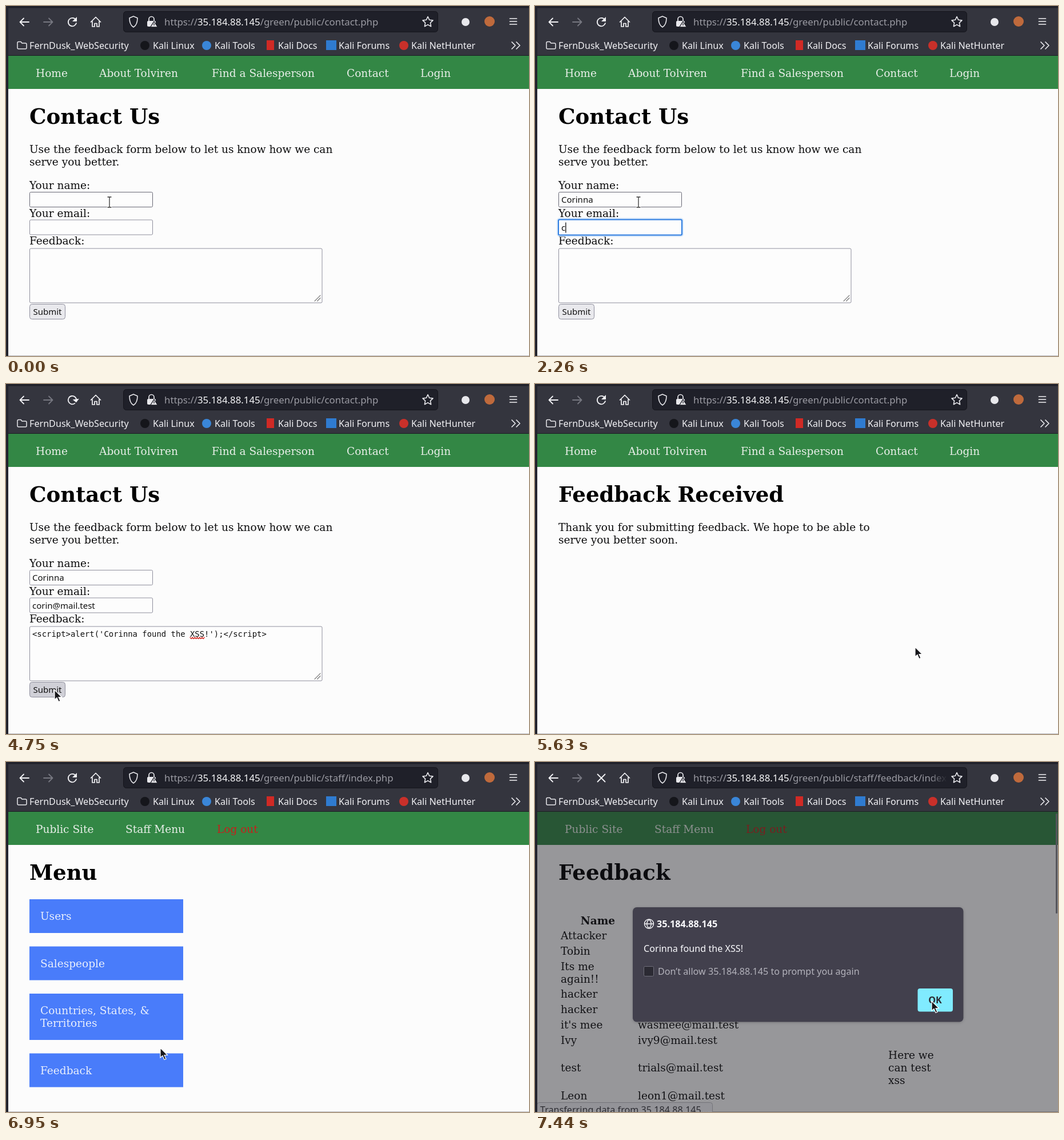
Recreate the animation shown at these times as an HTML page. Size 915 by 612 pixels, loop 8000 ms.

```html
<!DOCTYPE html>
<html lang="en">
<head>
<meta charset="utf-8">
<style>
  html, body { margin: 0; width: 100%; height: 100%; overflow: hidden; background: #fcfcfc; }
  svg { display: block; width: 915px; height: 612px; }
  text { white-space: pre; }
  .ui { font-family: "Noto Sans", "Open Sans", sans-serif; font-size: 16.15px; }
  .url { font-size: 16.82px; }
  .field { font-family: "Noto Sans", "Open Sans", sans-serif; font-size: 15px; }
  .code { font-family: "DejaVu Sans Mono", monospace; font-size: 13.9px; }
  .page { font-family: "DejaVu Serif", serif; font-size: 18.55px; }
  .h1 { font-size: 37.1px; font-weight: bold; }
</style>
</head>
<body>
<svg id="stage" viewBox="0 0 915 612"></svg>
<script>
const LOOP = 8000;
const HOST = "35.184.88.145";
const NAME = "Corinna";
const EMAIL = "corin@mail.test";
const stage = document.getElementById("stage");
const ruler = document.createElement("canvas").getContext("2d");

const text = (x, y, str, cls = "page", fill = "#0c0c0d", extra = "") =>
  `<text x="${x}" y="${y}" class="${cls}" fill="${fill}" ${extra}>${str}</text>`;
const rect = (x, y, w, h, fill, extra = "") =>
  `<rect x="${x}" y="${y}" width="${w}" height="${h}" fill="${fill}" ${extra}/>`;
const dot = (x, y, r, fill) => `<circle cx="${x}" cy="${y}" r="${r}" fill="${fill}"/>`;
const line = (d, color = "#f2f2f5", width = 1.8, extra = "") =>
  `<path d="${d}" fill="none" stroke="${color}" stroke-width="${width}" stroke-linecap="round" stroke-linejoin="round" ${extra}/>`;
const heading = str => text(41, 206, str, "page h1", "#000");

function textWidth(str) {
  ruler.font = '15px "Noto Sans", "Open Sans", sans-serif';
  return ruler.measureText(str).width;
}

// ---- browser chrome ----

function reloadIcon(mode) {
  if (mode === "stop") return line("M109.5 21.5l13 13M122.5 21.5l-13 13");
  if (mode === "closing") return line("M111 23l9 9");
  const turn = mode === "spin" ? 'transform="rotate(38 116 28)"' : "";
  return `<g ${turn}>${line("M122 24A7.2 7.2 0 1 0 123 30")}<path d="M124 19v8h-8z" fill="#f2f2f5"/></g>`;
}

function addressBar({ path, key, page }) {
  const x = key ? 309 : 277;
  const grey = "#9b9ba3";
  return rect(205.5, 9.5, 550, 36, "#1f2029", 'rx="5" stroke="#15151c"') +
    line("M223 18l7 3c0 8-2 13-7 16c-5-3-7-8-7-16z", "#e8e8ec", 1.6) +
    line("M250 26v-3a4.5 4.5 0 0 1 9 0v3", "#e8e8ec", 1.7) +
    rect(247, 26, 15, 10, "#e8e8ec", 'rx="2"') +
    `<path d="M259 27l6.5 10h-13z" fill="#e8e8ec" stroke="#1f2029" stroke-width="1.3"/>` +
    line("M259 31v2.5", "#1f2029", 1.3) +
    (key ? `<circle cx="283" cy="27" r="3.8" fill="none" stroke="#e8e8ec" stroke-width="1.8"/>` +
      line("M287 27h10v3M293 27v3", "#e8e8ec", 1.8) : "") +
    `<g clip-path="url(#urlClip)">` +
    text(x, 33.5, `https://<tspan fill="#f5f5f7">${HOST}</tspan>${path}`, "ui url", grey) + "</g>" +
    (page === "feedback" ? rect(690, 12, 31, 31, "url(#urlFade)") : "") +
    line("M738 18.5l2.7 5.8 6.3.8-4.6 4.3 1.2 6.3-5.6-3.1-5.6 3.1 1.2-6.3-4.6-4.3 6.3-.8z", "#e8e8ec", 1.6);
}

function bookmarks() {
  const items = [
    [257, "Kali Linux", dot(243, 69, 8, "#15161b")],
    [365, "Kali Tools", dot(351, 69, 8, "#3a86d8")],
    [476, "Kali Docs", rect(456, 60, 13, 17, "#d02a25")],
    [582, "Kali Forums", rect(560, 60, 18, 17, "#2f7bd0")],
    [709, "Kali NetHunter", dot(696, 69, 8, "#c9302a")]
  ];
  return line("M20 64.5q0-2 2-2h4l2 2.5h6q2 0 2 2v6q0 2-2 2h-12q-2 0-2-2z", "#e8e8ec", 1.5) +
    text(41, 75, "FernDusk_WebSecurity", "ui", "#f2f2f5") +
    items.map(([x, label, icon]) => icon + text(x, 75, label, "ui", "#f2f2f5")).join("") +
    line("M885 63l6 6-6 6M893 63l6 6-6 6", "#e8e8ec", 1.7);
}

const chrome = s =>
  rect(0, 0, 915, 87, "#34353e") + rect(0, 0, 915, 3.5, "#1f2029") +
  line("M40 28H25M31 21.5L24.5 28l6.5 6.5") +
  line("M66 28h15M75 21.5l6.5 6.5-6.5 6.5", "#777881") +
  reloadIcon(s.reload) +
  line("M148.5 28l8.5-8.5 8.5 8.5M151 27v9h4v-5.5h4V36h4v-9", "#f2f2f5", 1.7) +
  addressBar(s) +
  dot(804, 28, 7, "#e8e8ec") + dot(846, 27, 9, "#bf6a3c") +
  line("M881.5 22h12M881.5 27h12M881.5 32h12", "#f2f2f5", 1.7) +
  bookmarks() + rect(0, 86, 915, 1, "#1b1c22");

// ---- form parts ----

function box(x, y, w, h, focus, hover) {
  if (!focus) return rect(x + .5, y + .5, w - 1, h - 1, "#fdfdfd", `rx="2" stroke="${hover ? "#676774" : "#8f8f9d"}"`);
  return rect(x - 3, y - 3, w + 6, h + 6, "#d3e6fa", 'rx="5"') +
    rect(x, y, w, h, "#fdfdfd", 'rx="2" stroke="#2f7de0" stroke-width="2"');
}

const caret = (x, y) => rect(x, y, 1.3, 18, "#111");

function input(y, value, focus, hover) {
  return box(41, y, 216, 27, focus, hover) + text(46, y + 19, value, "field", "#111") +
    (focus ? caret(46 + textWidth(value), y + 5) : "");
}

function password(y, count, focus) {
  let out = box(41, y, 216, 27, focus);
  for (let i = 0; i < count; i++) out += dot(51.2 + i * 10.08, y + 14, 4.1, "#111");
  return out + (focus ? caret(46.5 + count * 10.1, y + 5) : "");
}

const submit = (y, hover) =>
  rect(41.5, y + .5, 62, 26, hover ? "#d0d0d7" : "#e9e9ed", 'rx="4" stroke="#8f8f9d"') +
  text(72.5, y + 19, "Submit", "field", "#111", 'text-anchor="middle"');

function feedbackBox(filled, focus) {
  let out = box(41, 423.5, 512.5, 96, focus) + line("M540 516l10-10M544.5 516l5.5-5.5", "#777", 1.1);
  if (filled) {
    out += text(46, 442, `&lt;script&gt;alert('${NAME} found the XSS!');&lt;/script&gt;`, "code", "#111") +
      line("M322 443" + "l2.1 2.6l2.1-2.6".repeat(6), "#d3261f", 1.2);
  }
  return out + (focus ? caret(filled ? 456 : 46, 428) : "");
}

// ---- pages ----

const nav = (...items) => rect(0, 87, 915, 58, "#338745") +
  items.map(([x, label, color = "#e9efe9"]) => text(x, 124, label, "page", color)).join("");
const publicNav = () => nav([52, "Home"], [163, "About Tolviren"], [360, "Find a Salesperson"], [596, "Contact"], [725, "Login"]);
const staffNav = () => nav([52, "Public Site"], [209, "Staff Menu"], [369, "Log out", "#c5201c"]);

const pages = {
  contact: s => publicNav() + heading("Contact Us") +
    text(41, 257, "Use the feedback form below to let us know how we can") +
    text(41, 279, "serve you better.") +
    text(41, 320, "Your name:") + text(41, 369, "Your email:") + text(41, 417, "Feedback:") +
    input(325, s.name, s.focus === "name", s.cursor[0] === "beam" && s.cursor[2] < 352) +
    input(373.5, s.email, s.focus === "email") +
    feedbackBox(s.pasted, s.focus === "feedback") + submit(521, s.cursor[0] === "arrow"),

  received: () => publicNav() + heading("Feedback Received") +
    text(41, 257, "Thank you for submitting feedback. We hope to be able to") +
    text(41, 279, "serve you better soon."),

  login: s => nav([52, "Public Site"]) + heading("Log in") +
    text(41, 257, "Username:") + text(41, 306, "Password:") +
    input(262.5, s.user, s.focus === "user") + password(311, s.dots, s.focus === "password") + submit(337.5),

  menu(s) {
    const items = [[240, 59, "Users"], [322.5, 59, "Salespeople"],
      [405, 81, "Countries, States, &amp;", "Territories"], [509.5, 59, "Feedback"]];
    return staffNav() + heading("Menu") + items.map(([y, h, ...rows]) =>
      rect(41, y, 269, h, s.hot && rows[0] === "Feedback" ? "#3f6fde" : "#497cfa") +
      rows.map((row, i) => text(60, y + 36 + i * 22, row, "page", "#e9effc")).join("")).join("");
  },

  feedback() {
    const rows = [[310, "Attacker"], [337, "Tobin"], [364, "Its me"], [386, "again!!"], [412, "hacker"], [439, "hacker"],
      [466, "it's mee", "wasmee"], [493, "Ivy", "ivy9"], [541, "test", "trials"], [590, "Leon", "leon1"]];
    return staffNav() + heading("Feedback") +
      text(110, 284, "Name", "page", "#0c0c0d", 'font-weight="bold" text-anchor="middle"') +
      rows.map(([y, name, mail]) => text(45, y, name) + (mail ? text(180, y, mail + "@mail.test") : "")).join("") +
      ["Here we", "can test", "xss"].map((row, i) => text(618, 519 + i * 22, row)).join("");
  }
};

const dialog = () =>
  rect(0, 87, 915, 525, "#1c1b22", 'opacity=".45"') + rect(911, 90, 3, 175, "#55555c", 'rx="1.5"') +
  rect(171, 254, 578.5, 200.5, "#42414d", 'rx="7" filter="url(#shadow)"') +
  line("M191.5 283a8 8 0 1 0 16 0a8 8 0 1 0-16 0h16M199.5 275c-5 5-5 11 0 16c5-5 5-11 0-16", "#f2f2f5", 1.4) +
  text(213, 288.5, HOST, "ui", "#fbfbfe", 'font-weight="600"') +
  text(190, 331.5, `${NAME} found the XSS!`, "ui", "#fbfbfe") +
  rect(190.5, 357.5, 17, 17, "#2b2a33", 'rx="2" stroke="#6f6e7a"') +
  text(215, 372, `Don’t allow ${HOST} to prompt you again`, "ui", "#b3b2bb") +
  rect(669.5, 396, 61.5, 40.5, "#80ebff", 'rx="4"') +
  text(700, 422, "OK", "ui", "#2b2a33", 'font-weight="600" text-anchor="middle"');

const statusBar = ([label, width]) =>
  rect(3.5, 595.5, width, 30, "#f6f6f8", 'rx="4" stroke="#bdbdc3"') + text(9, 614, label, "ui", "#3c3c42");

function pointer([kind, x, y, halo]) {
  const glow = halo ? dot(x, y, 18.5, "#fbf35a") : "";
  if (kind === "beam") {
    const d = `M${x - 3} ${y - 9}h2.5q.5 0 .5 1v16q0 1-.5 1h-2.5M${x + 3} ${y - 9}h-2.5M${x + 3} ${y + 9}h-2.5`;
    return glow + line(d, "#fff", 3) + line(d, "#333", 1.3);
  }
  if (kind === "arrow") {
    return glow + `<path transform="translate(${x} ${y})" d="M0 0v17l4-3.5 3 7 3-1.3-3-6.7h5.5z" fill="#16161a" stroke="#fff" stroke-width="1.2"/>`;
  }
  return "";
}

// ---- timeline: each entry changes part of the state ----

const login = { page: "login", path: "/green/public/staff/login.php", key: true };
const steps = [
  [0, { page: "contact", path: "/green/public/contact.php", key: false, reload: "", name: "", email: "", focus: "",
    pasted: false, user: "", dots: 0, hot: false, status: null, cursor: ["beam", 181, 343] }],
  [130, { focus: "name", name: NAME.slice(0, 1) }],
  [480, { name: NAME.slice(0, 2) }],
  [730, { name: NAME }],
  [1130, { focus: "email" }],
  [2260, { email: EMAIL.slice(0, 1) }],
  [2390, { email: EMAIL.slice(0, 5) }],
  [3010, { email: EMAIL.slice(0, 7) }],
  [3130, { email: EMAIL.slice(0, 11) }],
  [3250, { email: EMAIL }],
  [3640, { focus: "feedback", cursor: ["beam", 171, 444, true] }],
  [3770, { cursor: ["beam", 171, 444] }],
  [4140, { pasted: true }],
  [4250, { cursor: ["arrow", 85, 535] }],
  [4750, { focus: "", reload: "spin" }],
  [4870, { page: "received" }],
  [4990, { reload: "" }],
  [5110, { cursor: ["arrow", 92, 542] }],
  [5370, { cursor: ["arrow", 495, 565] }],
  [5490, { cursor: ["arrow", 530, 505] }],
  [5610, { cursor: ["arrow", 665, 460] }],
  [5730, { cursor: ["arrow", 770, 335] }],
  [5850, { cursor: ["arrow", 752, 122, true], status: [HOST + "/green/public/staff/login.php", 393] }],
  [5970, { ...login, status: null, cursor: ["arrow", 752, 122] }],
  [6350, { user: "gsample", focus: "user", cursor: ["none"] }],
  [6460, { focus: "password", dots: 12 }],
  [6560, { reload: "stop" }],
  [6690, { page: "menu", path: "/green/public/staff/index.php", key: false, reload: "spin" }],
  [6810, { reload: "" }],
  [6950, { cursor: ["arrow", 270, 500] }],
  [7070, { cursor: ["arrow", 240, 535], hot: true, status: [HOST + "/green/public/staff/feedback/index.php", 440] }],
  [7190, { cursor: ["arrow", 240, 535, true] }],
  [7320, { cursor: ["arrow", 380, 548], path: "/green/public/staff/feedback/index.php", reload: "closing", status: [HOST, 284] }],
  [7440, { page: "feedback", reload: "stop", cursor: ["arrow", 694, 418], status: [`Transferring data from ${HOST}…`, 307] }]
];

const defs = `<defs>
  <clipPath id="urlClip"><rect x="270" y="10" width="450" height="35"/></clipPath>
  <linearGradient id="urlFade"><stop stop-color="#1f2029" stop-opacity="0"/><stop offset="1" stop-color="#1f2029"/></linearGradient>
  <filter id="shadow"><feDropShadow dx="0" dy="1" stdDeviation="2.5" flood-opacity=".2"/></filter>
</defs>`;

function draw(s) {
  stage.innerHTML = defs + rect(0, 0, 915, 612, "#fcfcfc") + pages[s.page](s) + chrome(s) +
    rect(0, 611, 915, 1, "#b9b9be") + (s.status ? statusBar(s.status) : "") +
    (s.page === "feedback" ? dialog() : "") + rect(0, 0, 4, 612, "#22232d") + pointer(s.cursor);
}

let shown = -1;
function tick() {
  const now = performance.now() % LOOP;
  const index = steps.filter(([at]) => at <= now).length - 1;
  if (index !== shown) {
    shown = index;
    draw(Object.assign({}, ...steps.slice(0, index + 1).map(([, change]) => change)));
  }
  requestAnimationFrame(tick);
}
tick();
</script>
</body>
</html>
```
